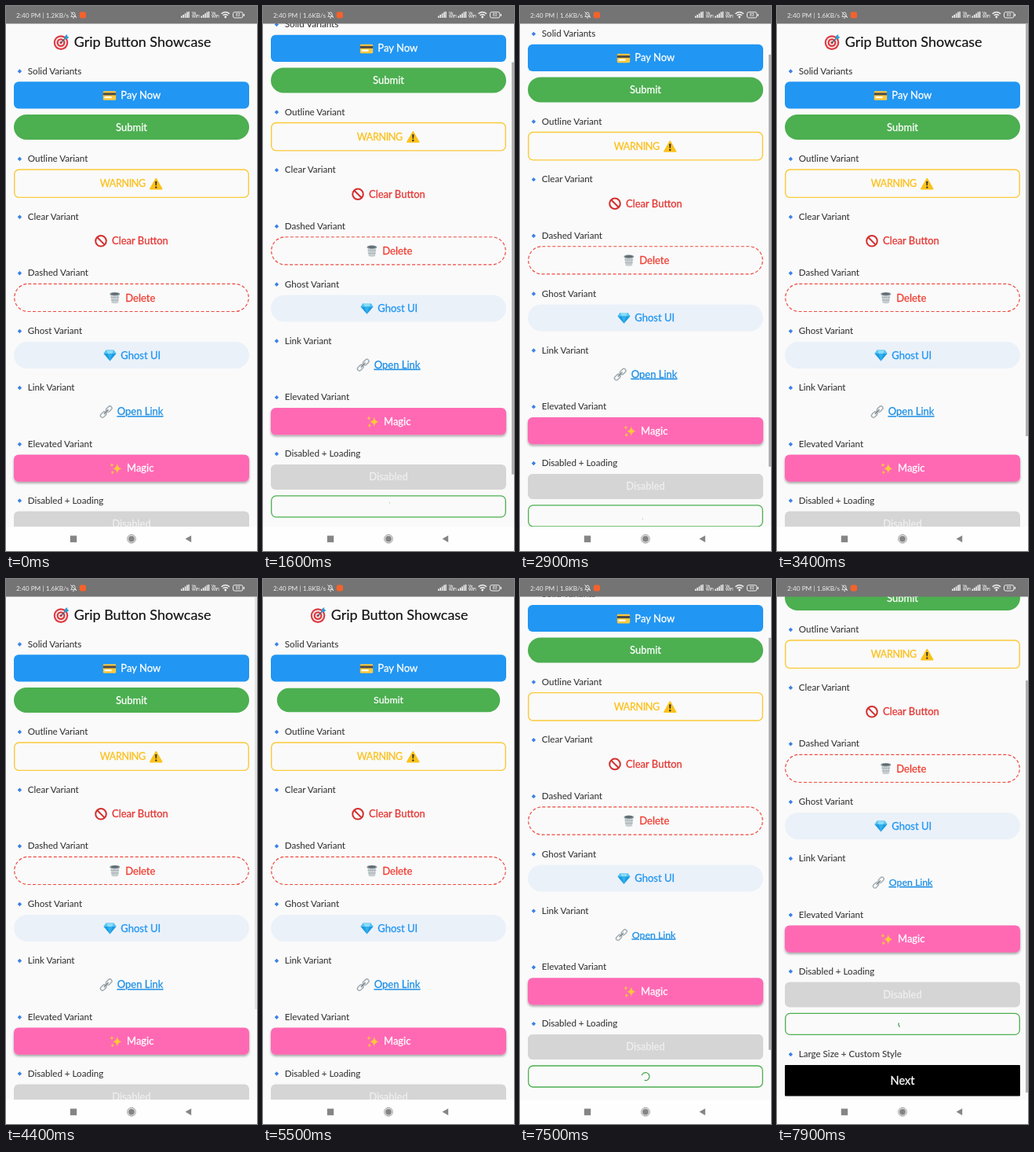
Animation, 320 px wide and 693 px high, one loop 8 s. Source, as an HTML page:

```html
<!DOCTYPE html>
<html lang="en">
<head>
<meta charset="utf-8">
<title>Button showcase</title>
<style>
  html, body { margin: 0; width: 100%; height: 100%; overflow: hidden; background: #fafafa; }
  svg { display: block; width: 100%; height: 100%; }
  text { font: 400 13px Lato, "Open Sans", sans-serif; fill: currentColor; stroke: currentColor; stroke-width: .28px; }
  .label { font-size: 11.6px; stroke-width: .05px; color: #333; }
  .title { font-size: 17.9px; stroke-width: .15px; color: #111; }
  .status { font-size: 8.3px; stroke: none; color: #ececec; }
  .tiny { font-size: 4.6px; font-weight: 700; stroke: none; color: #ececec; }
  .caps { font-size: 12.5px; letter-spacing: -.35px; }
  .large { font-size: 14.5px; }
  .mid { text-anchor: middle; }
</style>
</head>
<body>
<svg viewBox="0 0 320 693">
  <defs>
    <filter id="shadow" x="-5%" y="-20%" width="110%" height="160%">
      <feDropShadow dx="0" dy="2" stdDeviation="1.6" flood-opacity=".35"/>
    </filter>
    <clipPath id="deleteClip"><rect x="12" y="354" width="296" height="34"/></clipPath>
    <clipPath id="nextClip"><rect x="10" y="748" width="300" height="39.5"/></clipPath>

    <g id="dart">
      <circle r="9.3" cy=".6" fill="#dc3a40"/>
      <circle r="7.2" cy=".6" fill="#f6eeee"/>
      <circle r="5.4" cy=".6" fill="#dc3a40"/>
      <circle r="3.2" cy=".6" fill="#f6eeee"/>
      <circle r="1.7" cy=".6" fill="#dc3a40"/>
      <path d="M0 .8L6-5.4" stroke="#35627c" stroke-width="1.3"/>
      <path d="M4.5-4.2L5-7.7 8-10 8.3-7.2 10.4-6.6 8-4Z" fill="#2f9bd4"/>
    </g>
    <g id="card">
      <rect x="-8.2" y="-5.8" width="16.4" height="11.6" rx="1.4" fill="#fcc93e"/>
      <rect x="-8.2" y="-3.6" width="16.4" height="3" fill="#4b4b4b"/>
      <rect x="-6.4" y="1" width="9" height="2.2" fill="#fff"/>
    </g>
    <g id="warn">
      <path d="M0-6.6L7.3 6.2H-7.3Z" fill="#fcc21b" stroke="#fcc21b" stroke-width="1.8" stroke-linejoin="round"/>
      <path d="M-1.2-3.4H1.2L.7 2H-.7Z" fill="#333"/>
      <circle cy="4.3" r="1.2" fill="#333"/>
    </g>
    <g id="ban" fill="none" stroke="#d32f2f" stroke-width="2">
      <circle r="6.8"/><path d="M-4.8-4.8L4.8 4.8"/>
    </g>
    <g id="trash">
      <path d="M-5.8-4.5H5.8L4.6 6.6Q0 8.6-4.6 6.6Z" fill="#dfe4e6"/>
      <path d="M-4-3L-2.8 6.6M-1.3-3L-1 7M1.3-3L1 7M4-3L2.8 6.6M-5.3-.5H5.3M-5 3H5" stroke="#9aa5aa" stroke-width=".7"/>
      <ellipse cy="-4.8" rx="6.4" ry="2.3" fill="#8a969b"/>
      <ellipse cy="-5" rx="4.8" ry="1.3" fill="#5c696f"/>
    </g>
    <g id="gem">
      <path d="M-4.8-6.4H4.8L8-2 0 7.4-8-2Z" fill="#1c9be0"/>
      <path d="M-4.8-6.4L-3-2H-8ZM4.8-6.4L3-2H8Z" fill="#57c4f2"/>
      <path d="M-4.8-6.4H4.8L3-2H-3Z" fill="#8bdcf9"/>
      <path d="M-3-2H3L0 7.4Z" fill="#31b1ee"/>
    </g>
    <g id="chain" fill="none" stroke="#a3adb2" stroke-width="1.5">
      <g transform="rotate(-45)">
        <rect x="-9.2" y="-2.5" width="8.4" height="5" rx="2.5"/>
        <rect x=".8" y="-2.5" width="8.4" height="5" rx="2.5"/>
        <path d="M-3.4 0H3.4" stroke="#828e94" stroke-linecap="round"/>
      </g>
    </g>
    <g id="sparkles" fill="#fdc83a">
      <path id="spark" d="M0-6.4Q.7-.7 5.6 0 .7.7 0 6.4-.7.7-5.6 0-.7-.7 0-6.4Z" transform="translate(1.8 .2)"/>
      <use href="#spark" transform="translate(-5.8 -4.4) scale(.42)"/>
      <use href="#spark" transform="translate(-5 5) scale(.42)"/>
    </g>
    <g id="signal" fill="#f0f0f0">
      <rect x="0" y="5.6" width="1.6" height="2.4"/><rect x="2.4" y="4" width="1.6" height="4"/>
      <rect x="4.8" y="2.4" width="1.6" height="5.6"/><rect x="7.2" y=".6" width="1.6" height="7.4"/>
      <rect x="9.4" y="0" width="1.4" height="8"/>
    </g>
    <g id="voice"><text class="tiny">Vo</text><text class="tiny" y="4.6">WiFi</text></g>
  </defs>

  <rect width="320" height="693" fill="#fafafa"/>

  <g id="page">
    <use href="#dart" x="70" y="46"/>
    <text class="title" x="86.8" y="52">Grip Button Showcase</text>
    <g id="labels"></g>

    <g id="pay">
      <rect x="10" y="96.3" width="300" height="34.2" rx="6" fill="#2196f3"/>
      <use href="#card" x="132" y="114"/>
      <text x="146.3" y="118" color="#fff">Pay Now</text>
    </g>
    <g id="submit">
      <rect x="10" y="138" width="300" height="32" rx="16" fill="#4caf50"/>
      <text class="mid" x="160" y="158.6" color="#fff">Submit</text>
    </g>
    <g id="warning">
      <rect x="10.7" y="208" width="298.6" height="35.4" rx="6" fill="none" stroke="#fbc93a" stroke-width="1.4"/>
      <text class="caps" x="119.8" y="230.2" color="#fcc01c">WARNING</text>
      <use href="#warn" x="191.3" y="226.3"/>
    </g>
    <g id="clear">
      <use href="#ban" x="121" y="298.8"/>
      <text x="135" y="303.2" color="#e53935">Clear Button</text>
    </g>
    <g id="delete">
      <g clip-path="url(#deleteClip)"><circle id="deleteInk" cx="262" cy="371" fill="#000"/></g>
      <rect x="10.7" y="353.3" width="298.6" height="35.2" rx="17.6" fill="none" stroke="#ef4a3f" stroke-width="1.2" stroke-dasharray="4 2.5"/>
      <use href="#trash" x="138.8" y="371"/>
      <text x="152.3" y="375.6" color="#f03d31">Delete</text>
    </g>
    <g id="ghost">
      <rect x="10" y="427" width="300" height="34" rx="17" fill="#ebf1f9"/>
      <use href="#gem" x="132.5" y="444"/>
      <text x="146.3" y="448.5" color="#2196f3">Ghost UI</text>
    </g>
    <g id="link">
      <use href="#chain" x="127.7" y="516"/>
      <text x="141.8" y="520.2" color="#1e8fe6" text-decoration="underline">Open Link</text>
    </g>
    <g>
      <rect x="10" y="570.6" width="300" height="34.2" rx="6" fill="#ff69b4" filter="url(#shadow)"/>
      <use href="#sparkles" x="140" y="588"/>
      <text x="154" y="592.4" color="#fff">Magic</text>
    </g>
    <rect x="10" y="642.5" width="300" height="32" rx="6" fill="#d5d5d5"/>
    <text class="mid" x="160" y="662.6" color="#efefef">Disabled</text>
    <rect x="10.7" y="682.4" width="298.6" height="27" rx="6" fill="none" stroke="#4caf50" stroke-width="1.3"/>
    <path id="spinner" fill="none" stroke="#43a047" stroke-width="1.2"/>
    <rect x="10" y="748" width="300" height="39.5" rx="1" fill="#000"/>
    <g clip-path="url(#nextClip)"><circle id="nextInk" cx="73" cy="1267" r="510" fill="#191919"/></g>
    <text class="mid large" x="160" y="772.6" color="#fff">Next</text>
  </g>

  <rect id="thumb" x="317" width="3" height="524" fill="#b1b1b1"/>

  <rect width="320" height="22.5" fill="#747474"/>
  <text class="status" id="speed" x="13" y="14.6"></text>
  <g fill="none" stroke="#ececec" stroke-width=".9">
    <path d="M82.8 13.6H89.2Q88 12.5 88 10.4 88 8 86 8 84 8 84 10.4 84 12.5 82.8 13.6Z"/>
    <path d="M85 15.2H87M82.4 7.4L90 15"/>
  </g>
  <rect x="93.8" y="7.6" width="8.2" height="7.8" rx="2" fill="#f4622c"/>
  <use href="#signal" x="223" y="7"/><use href="#voice" x="237" y="10.6"/>
  <use href="#signal" x="248.5" y="7"/><use href="#voice" x="262" y="10.6"/>
  <g fill="none" stroke="#f0f0f0" stroke-width="1.5">
    <path d="M274.6 9.8Q279.8 5.6 285 9.8M276.6 12Q279.8 9.4 283 12"/>
    <circle cx="279.8" cy="14" r=".7" fill="#f0f0f0"/>
    <rect x="289.5" y="7.8" width="12.4" height="7.2" rx="2" stroke-width="1"/>
    <path d="M303.4 10V13" stroke-width="1.3"/>
  </g>
  <text class="tiny mid" x="295.7" y="13.1">83</text>

  <rect y="662" width="320" height="31" fill="#fefefe"/>
  <g fill="#858585">
    <rect x="81.8" y="673.5" width="8.4" height="8.4"/>
    <circle cx="160" cy="677.6" r="3.9"/>
    <circle cx="160" cy="677.6" r="5.3" fill="none" stroke="#858585" stroke-width=".9"/>
    <path d="M228.6 677.6L236.2 673.3V681.9Z"/>
  </g>
</svg>

<script>
const LOOP = 8000, MAX_SCROLL = 130;
const $ = id => document.getElementById(id);
const clamp = x => Math.min(1, Math.max(0, x));
const ramp = (t, from, to) => clamp((t - from) / (to - from));
const ease = x => x * x * (3 - 2 * x);

const LABELS = [
  ['Solid Variants', 82.5], ['Outline Variant', 194], ['Clear Variant', 267.7],
  ['Dashed Variant', 339.3], ['Ghost Variant', 413], ['Link Variant', 485],
  ['Elevated Variant', 556.7], ['Disabled + Loading', 628.5], ['Large Size + Custom Style', 734]
];
$('labels').innerHTML = LABELS.map(([name, y]) =>
  `<path d="M17.4 ${y - 2.2}l2.7 2.7-2.7 2.7-2.7-2.7Z" fill="#3b82e6"/>
   <text class="label" x="27.8" y="${y + 4.1}">${name}</text>`).join('');

// id, vertical centre, finger down, finger up
const PRESSES = [
  ['pay', 113.5, 4950, 5120], ['submit', 154, 5370, 5530], ['warning', 225.7, 5780, 5920],
  ['clear', 298.5, 6120, 6260], ['delete', 371, 6450, 6610], ['ghost', 444, 6830, 6960],
  ['link', 515.5, 7130, 8200]
];

// Cubic bezier (.4, 0, .2, 1)
function fastOutSlowIn(x) {
  let lo = 0, hi = 1;
  for (let i = 0; i < 20; i++) {
    const u = (lo + hi) / 2, v = 1 - u;
    if (1.2 * v * v * u + .6 * v * u * u + u ** 3 < x) lo = u; else hi = u;
  }
  return 3 * (1 - lo) * lo * lo + lo ** 3;
}

function spinnerPath(t) {
  const cycle = ((t - 1575) / 1333 + 10) % 1;
  const turn = (t - 1540) / 2222;
  const head = fastOutSlowIn(clamp(cycle * 2));
  const tail = fastOutSlowIn(clamp(cycle * 2 - 1));
  const start = Math.PI * (-.5 + 1.5 * tail + 2 * turn + .5 * cycle);
  const end = start + Math.max(.12, 1.5 * Math.PI * (head - tail));
  const at = a => `${160 + 5 * Math.cos(a)} ${696 + 5 * Math.sin(a)}`;
  return `M${at(start)}A5 5 0 ${end - start > Math.PI ? 1 : 0} 1 ${at(end)}`;
}

function scrollAt(t) {
  const down = ease(ramp(t, 1314, 1922));
  const back = ease(ramp(t, 2470, 3200));
  const again = ease(ramp(t, 7260, 7750));
  return MAX_SCROLL * (down - back + again);
}

function render(t) {
  const scroll = scrollAt(t);
  $('page').setAttribute('transform', `translate(0 ${-scroll})`);
  $('thumb').setAttribute('y', 23 + scroll * 106 / MAX_SCROLL);
  $('thumb').setAttribute('opacity',
    ramp(t, 1300, 1500) - ramp(t, 4200, 4500) + ramp(t, 7260, 7460));

  for (const [id, y, down, up] of PRESSES) {
    const s = 1 - .052 * (ramp(t, down, down + 100) - ramp(t, up, up + 100));
    $(id).setAttribute('transform', `translate(160 ${y}) scale(${s}) translate(-160 ${-y})`);
  }

  $('deleteInk').setAttribute('r', 152 * ramp(t, 6480, 6700) + 90 * ramp(t, 6700, 6850));
  $('deleteInk').setAttribute('opacity', .14 * (ramp(t, 6480, 6560) - ramp(t, 6720, 6920)));
  $('nextInk').setAttribute('opacity', ramp(t, 2290, 2390) - ramp(t, 2450, 2650));
  $('spinner').setAttribute('d', spinnerPath(t));

  const rate = t < 1300 ? '1.2' : t < 5300 ? '1.6' : '1.8';
  $('speed').textContent = `2:40 PM | ${rate}KB/s`;
}

const begin = performance.now();
function tick() {
  render((performance.now() - begin) % LOOP);
  requestAnimationFrame(tick);
}
tick();
</script>
</body>
</html>
```
